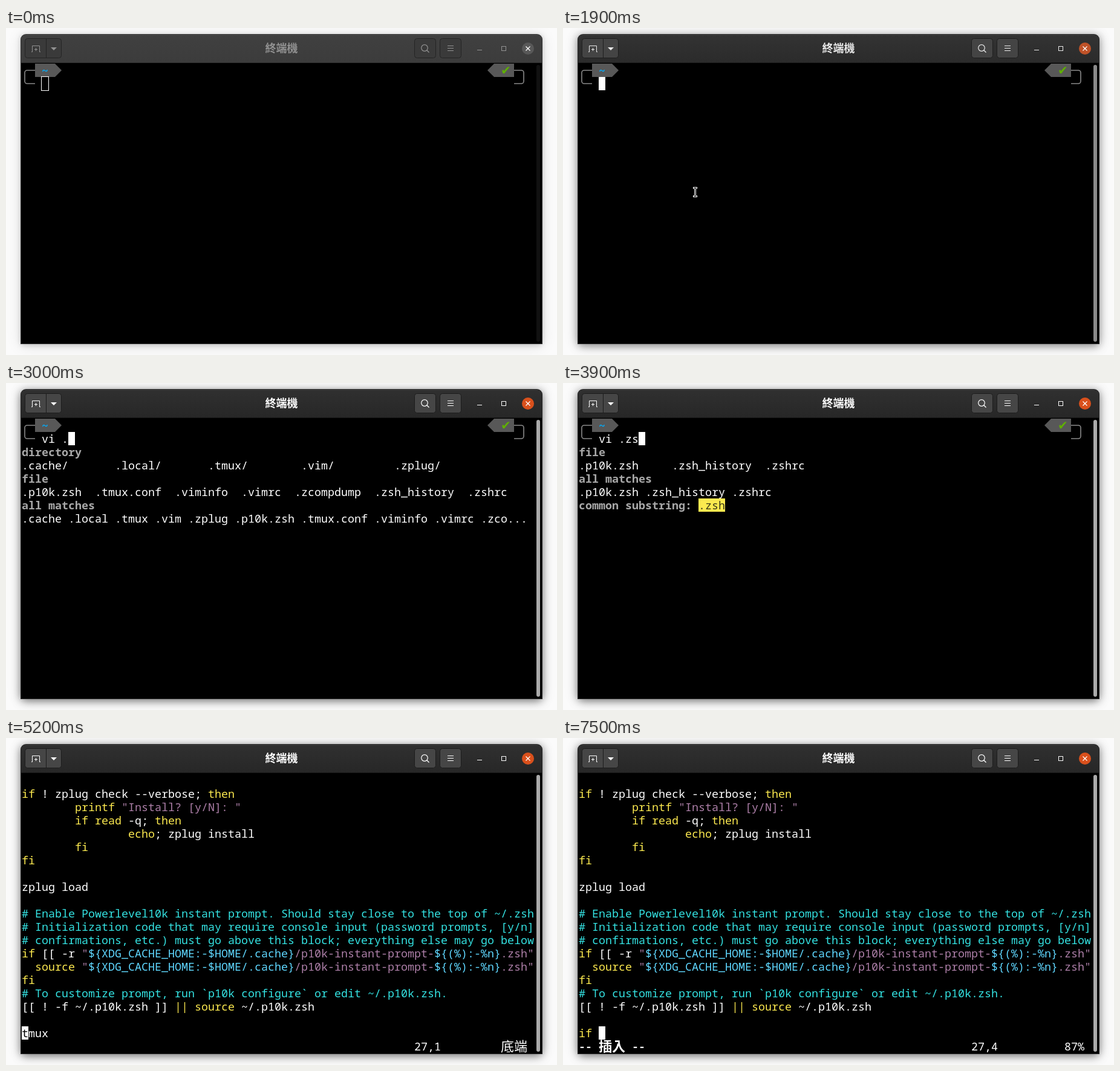
Recreate the animation shown at these times as an HTML page with a canvas. Size 911x541 px, loop 8 s.

```html
<!DOCTYPE html>
<html lang="zh-Hant">
<head>
<meta charset="utf-8">
<title>終端機</title>
<style>
html, body { margin: 0; width: 100%; height: 100%; overflow: hidden; background: #fcfcfc; }
canvas { display: block; }
</style>
</head>
<body>
<canvas id="stage" width="911" height="541"></canvas>
<script>
const ctx = document.getElementById('stage').getContext('2d');
const LOOP = 8000, CW = 11, CH = 22, X0 = 26, Y0 = 59;
const MONO = '"Noto Sans Mono", "DejaVu Sans Mono", monospace';
const CJK = '"Noto Sans CJK TC", "Noto Sans CJK", sans-serif';

// Inline style codes: "§" plus one letter
const STYLES = {
  w: { fg: '#ffffff' },
  W: { fg: '#ffffff', bold: true },
  y: { fg: '#fce94f' },
  c: { fg: '#34e2e2' },
  p: { fg: '#ad7fa8' },
  b: { fg: '#5fd7ff' },
  h: { fg: '#a8a8a8', bold: true },
  t: { fg: '#00afff', bold: true },
  m: { fg: '#103c3c', bg: '#34e2e2' },
  s: { fg: '#3a3718', bg: '#fce94f' },
  k: { fg: '#000000' }
};

const table = (widths, text) => text.split(' ').map((s, i) => s.padEnd(widths[i] || 0)).join('');

const commands = [
  'validlocale vam VBox vboxautostart',
  'VBoxAutostart vboxballoonctrl VBoxBalloonCtrl vboxbugreport',
  'VBoxBugReport vboxconfig VBoxDTrace vboxheadless',
  'VBoxHeadless vbox-img vboximg-mount vboxmanage',
  'VBoxManage vboxsdl VBoxSDL VBoxTunctl',
  'VBoxVRDP vboxwebsrv vcstime vdir',
  'verify-uselistorder-9 vi view viewres',
  'vigr vim vim-addon-manager vim-addons',
  'vimdiff vim.gtk3 vimplate vim.tiny',
  'vimtutor vipw virtfs-proxy-helper virtualbox',
  'VirtualBox virtualboxvm VirtualBoxVM visudo',
  'vlc vlc-wrapper vmstat vmwarectrl',
  'volname vpddecode vstp'
].map(row => table([23, 17, 21], row));

const even = [14, 14, 14, 14];
const listV = ['§hshell function', 'vcs_info', '§hbuiltin command', 'vared',
  '§hexternal command', ...commands, '§m(MORE)'];
const listDot = [
  '§hdirectory', table(even, '.cache/ .local/ .tmux/ .vim/ .zplug/'),
  '§hfile', table([11, 12, 10, 8, 12, 14],
    '.p10k.zsh .tmux.conf .viminfo .vimrc .zcompdump .zsh_history .zshrc'),
  '§hall matches',
  '.cache .local .tmux .vim .zplug .p10k.zsh .tmux.conf .viminfo .vimrc .zco...'];
const listZ = [
  '§hdirectory', '.zplug/',
  '§hfile', table(even, '.p10k.zsh .zcompdump .zsh_history .zshrc'),
  '§hall matches', '.zplug .p10k.zsh .zcompdump .zsh_history .zshrc'];
const listZsh = [
  '§hfile', table(even, '.p10k.zsh .zsh_history .zshrc'),
  '§hall matches', '.p10k.zsh .zsh_history .zshrc'];

const cachePath = '§p"§b${XDG_CACHE_HOME:-$HOME/.cache}§p/p10k-instant-prompt-§b${(%):-%n}§p.zsh"';
const zshrc = [
  '§ysource§w ~/.zplug/init.zsh',
  '',
  'zplug §p"zsh-users/zsh-autosuggestions"',
  'zplug §p"zsh-users/zsh-completions"',
  'zplug §p"zsh-users/zsh-syntax-highlighting"',
  '',
  '§c# Install missing plugins',
  '',
  '§yif§w ! zplug check --verbose; §ythen',
  '        §yprintf §p"Install? [y/N]: "',
  '        §yif read§w -q; §ythen',
  '                §yecho§w; zplug install',
  '        §yfi',
  '§yfi',
  '',
  'zplug load',
  '',
  '§c# Enable Powerlevel10k instant prompt. Should stay close to the top of ~/.zsh',
  '§c# Initialization code that may require console input (password prompts, [y/n]',
  '§c# confirmations, etc.) must go above this block; everything else may go below',
  '§yif§w [[ -r ' + cachePath,
  '  §ysource ' + cachePath,
  '§yfi',
  '§c# To customize prompt, run `p10k configure` or edit ~/.p10k.zsh.',
  '[[ ! -f ~/.p10k.zsh ]] §y||§w §ysource§w ~/.p10k.zsh',
  '',
  'tmux'
];

const shell = (typed, list = []) =>
  ({ prompt: true, lines: ['', '   ' + typed, ...list], row: 1, col: 3 + typed.length });

function vim(lines, top, row, col, msg, pos, place) {
  const view = lines.slice(top, top + 20);
  const under = view[row].replace(/§./g, '')[col];
  return { lines: view, row, col, under, status: { msg, pos, place } };
}

const insert = (text, col) => vim([...zshrc.slice(0, 26), text, 'tmux'], 7, 19, col,
  '§W-- 插入 --', '27,' + (col + 1), ' 87%');

const screens = [
  [0, shell('')],
  [2600, shell('vi', listV)],
  [2700, shell('vi ', listV)],
  [2800, shell('vi ')],
  [3000, shell('vi .', listDot)],
  [3300, shell('vi .z', listZ)],
  [3900, shell('vi .zs', [...listZsh, '§hcommon substring: §s.zsh'])],
  [4000, shell('vi .zsh', listZsh)],
  [4300, shell('vi .zshrc', ['§hfile', '.zshrc'])],
  [4600, vim(zshrc, 0, 0, 0, '".zshrc" 27L, 816C', '1,1', '頂端')],
  [5200, vim(zshrc, 7, 19, 0, '', '27,1', '底端')],
  [6400, vim(zshrc, 7, 18, 0, '', '26,0-1', '底端')],
  [6900, insert('', 0)],
  [7300, insert('i', 1)],
  [7500, insert('§yif ', 3)]
];

const focusSteps = [[0, 0], [1800, 0.4], [1900, 0.8], [2000, 1]];
const pointerSteps = [[0, null], [1400, [185, 255]], [1500, [208, 265]], [1600, [218, 271]], [2600, null]];

const at = (steps, t) => steps.filter(s => s[0] <= t).pop()[1];
const mix = (a, b, k) => 'rgb(' + a.map((v, i) => Math.round(v + (b[i] - v) * k)) + ')';
const grey = (a, b, k) => mix([a, a, a], [b, b, b], k);

function rect(color, x, y, w, h) {
  ctx.fillStyle = color;
  ctx.fillRect(x, y, w, h);
}

function round(x, y, w, h, r) {
  ctx.beginPath();
  ctx.roundRect(x, y, w, h, r);
}

function disc(color, x, y, r) {
  ctx.fillStyle = color;
  ctx.beginPath();
  ctx.arc(x, y, r, 0, Math.PI * 2);
  ctx.fill();
}

function poly(color, ...p) {
  ctx.fillStyle = color;
  ctx.beginPath();
  for (let i = 0; i < p.length; i += 2) ctx.lineTo(p[i], p[i + 1]);
  ctx.fill();
}

function path(color, width, ...p) {
  ctx.strokeStyle = color;
  ctx.lineWidth = width;
  ctx.beginPath();
  for (let i = 0; i < p.length; i += 2) ctx.lineTo(p[i], p[i + 1]);
  ctx.stroke();
}

function write(text, row, col = 0) {
  let style = STYLES.w;
  const y = Y0 + row * CH;
  ctx.textAlign = 'left';
  for (let i = 0; i < text.length; i++) {
    if (text[i] === '§') {
      style = STYLES[text[++i]];
      continue;
    }
    const wide = text[i] > '\u2fff', x = X0 + col * CW;
    if (style.bg) rect(style.bg, x, y, CW, CH);
    ctx.font = (style.bold ? 'bold ' : '') + (wide ? '22px ' + CJK : '18.33px ' + MONO);
    ctx.fillStyle = style.fg;
    ctx.fillText(text[i], x, y + (wide ? 19 : 18));
    col += wide ? 2 : 1;
  }
}

function shadow(alpha, dy, blur, spread) {
  ctx.save();
  ctx.shadowColor = `rgba(0,0,0,${alpha})`;
  ctx.shadowBlur = blur;
  ctx.shadowOffsetX = 2000;
  ctx.shadowOffsetY = dy;
  ctx.fillStyle = '#000';
  round(25 - spread - 2000, 11 - spread, 861 + 2 * spread, 511 + 2 * spread, 8);
  ctx.fill();
  ctx.restore();
}

function button(x, w, k) {
  round(x + 0.5, 17.5, w - 1, 32, 4);
  ctx.fillStyle = grey(58, 70, k);
  ctx.fill();
  ctx.strokeStyle = grey(36, 28, k);
  ctx.lineWidth = 1;
  ctx.stroke();
}

function frame(k) {
  rect('#fcfcfc', 0, 0, 911, 541);
  shadow(0.1, 3, 24, 2);
  shadow(0.15 * (1 - k), 2, 6, 2);
  shadow(0.5 * k, 3, 14, 1);
  ctx.fillStyle = grey(52, 38, k);
  round(24, 10, 863, 513, [9, 9, 0, 0]);
  ctx.fill();

  const bar = ctx.createLinearGradient(0, 11, 0, 57);
  bar.addColorStop(0, grey(64, 48, k));
  bar.addColorStop(1, grey(60, 39, k));
  ctx.fillStyle = bar;
  round(25, 11, 861, 46, [8, 8, 0, 0]);
  ctx.fill();
  rect(grey(74, 62, k), 32, 11, 847, 1);
  rect(grey(44, 24, k), 25, 57, 861, 1);
  rect('#000', 25, 58, 861, 464);

  button(31, 61, k);
  button(675, 36, k);
  button(717, 36, k);
  rect(grey(36, 28, k), 66, 18, 1, 31);

  const ink = grey(146, 255, k);
  path(ink, 1, 42, 39.5, 43.5, 39.5, 43.5, 29.5, 55.5, 29.5, 55.5, 39.5, 57, 39.5);
  path(ink, 1, 47, 35.5, 52, 35.5);
  path(ink, 1, 49.5, 33, 49.5, 38);
  poly(ink, 74, 32, 84, 32, 79, 37);
  ctx.lineWidth = 1.2;
  ctx.beginPath();
  ctx.arc(692, 33, 5.3, 0, Math.PI * 2);
  ctx.stroke();
  path(ink, 1.3, 695.8, 36.8, 699.5, 40.5);
  for (const y of [29.5, 33.5, 37.5]) path(ink, 1, 730, y, 740, y);
  path(ink, 1, 779, 36.5, 787, 36.5);
  ctx.strokeRect(819.5, 30.5, 7, 7);

  disc(mix([88, 88, 88], [217, 80, 28], k), 863, 34, 10);
  path('#fff', 1.3, 859.5, 30.5, 866.5, 37.5);
  path('#fff', 1.3, 866.5, 30.5, 859.5, 37.5);

  ctx.font = 'bold 18px ' + CJK;
  ctx.textAlign = 'center';
  ctx.fillStyle = ink;
  ctx.fillText('終端機', 455.5, 40);

  ctx.fillStyle = grey(17, 170, k);
  round(877, 61, 6, 458, 3);
  ctx.fill();
}

function bracket(x, edge) {
  ctx.strokeStyle = '#8a8a8a';
  ctx.lineWidth = 1.6;
  ctx.beginPath();
  ctx.moveTo(x, 70);
  ctx.arcTo(edge, 70, edge, 81, 4);
  ctx.arcTo(edge, 92, x, 92, 4);
  ctx.lineTo(x, 92);
  ctx.stroke();
}

function prompt() {
  const bg = '#585858';
  bracket(48, 31);
  bracket(840, 856);
  poly(bg, 48, 59, 81, 59, 92, 70, 81, 81, 48, 81);
  poly(bg, 840, 59, 807, 59, 796, 70, 807, 81, 840, 81);
  write('§t~', 0, 3);
  ctx.font = '20px "DejaVu Sans", sans-serif';
  ctx.fillStyle = '#5faf00';
  ctx.fillText('✔', 818, 77);
}

function caret(s, focused) {
  const x = X0 + s.col * CW, y = Y0 + s.row * CH;
  if (!focused) {
    ctx.strokeStyle = '#fff';
    ctx.lineWidth = 1;
    ctx.strokeRect(x - 0.5, y - 0.5, CW + 1, CH + 1);
    return;
  }
  rect('#fff', x, y, CW, CH);
  if (s.under) write('§k' + s.under, s.row, s.col);
}

function pointer([x, y]) {
  for (const [color, w, e] of [['#fff', 3, 1], ['#000', 1, 0]]) {
    path(color, w, x + 0.5, y - 7, x + 0.5, y + 7);
    for (const dy of [-7, 7]) path(color, w, x - 2 - e, y + dy + 0.5, x + 3 + e, y + dy + 0.5);
  }
}

function draw(t) {
  const k = at(focusSteps, t), s = at(screens, t), p = at(pointerSteps, t);
  frame(k);
  if (s.prompt) prompt();
  s.lines.forEach((line, i) => write(line, i));
  if (s.status) {
    write(s.status.msg, 20);
    write(s.status.pos, 20, 59);
    write(s.status.place, 20, 72);
  }
  caret(s, k > 0);
  if (p) pointer(p);
}

const start = performance.now();
function tick(now) {
  draw(Math.max(0, now - start) % LOOP);
  requestAnimationFrame(tick);
}
draw(0);
requestAnimationFrame(tick);
</script>
</body>
</html>
```
